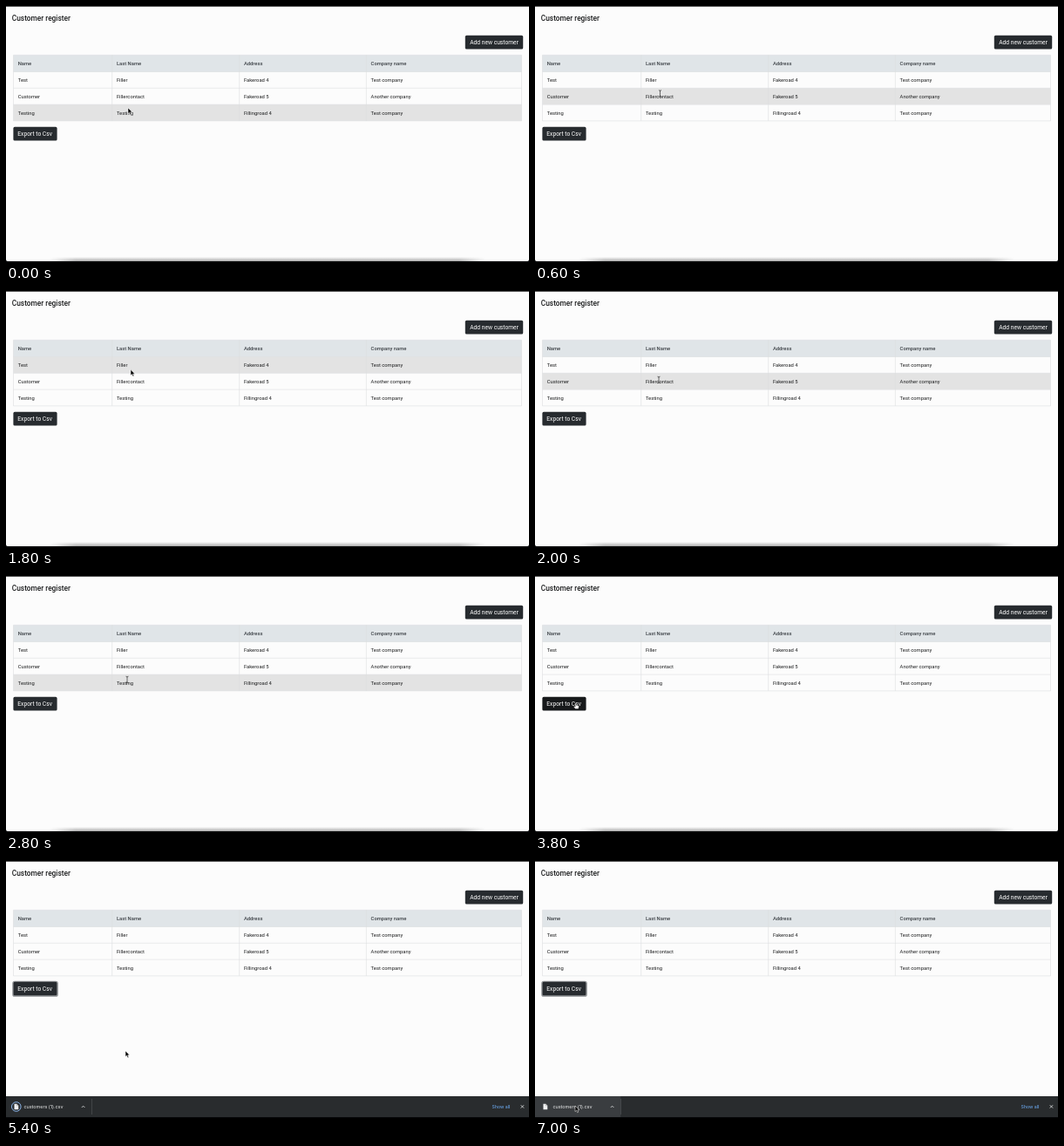
Recreate the animation shown at these times as an HTML page. Size 600 px wide and 295 px high, loop 8000 ms.

```html
<!DOCTYPE html>
<html lang="en">
<head>
<meta charset="utf-8">
<title>Customer register</title>
<style>
  html, body { margin: 0; width: 100%; height: 100%; overflow: hidden; background: #fcfcfc; }
  svg { display: block; width: 100%; height: 100%; font: 5.83px Roboto, sans-serif; fill: #1c1d1e; }
  .title { font-size: 8.33px; font-weight: 500; }
  .head { font-weight: 500; fill: #3c4146; }
  .button { font-size: 6.7px; fill: #fff; }
  .bar text { font: 5.4px Inter, sans-serif; fill: #eceded; }
  .bar .link { font-size: 5.2px; font-weight: 500; fill: #669fe0; }
  .line { fill: none; stroke: #dcdedf; stroke-width: .6; }
  .icon { fill: none; stroke: #e4e5e6; stroke-width: .8; }
</style>
</head>
<body>
<svg viewBox="0 0 600 295">
  <defs>
    <linearGradient id="fall" x2="0" y2="1">
      <stop offset="0" stop-color="#777" stop-opacity="0"/>
      <stop offset="1" stop-color="#777" stop-opacity=".6"/>
    </linearGradient>
    <linearGradient id="sides">
      <stop offset="0" stop-color="#000"/>
      <stop offset=".06" stop-color="#fff"/>
      <stop offset=".94" stop-color="#fff"/>
      <stop offset="1" stop-color="#000"/>
    </linearGradient>
    <mask id="fade"><rect x="50" y="287" width="500" height="7" fill="url(#sides)"/></mask>
  </defs>
  <rect width="600" height="295" fill="#fcfcfc"/>
  <rect width="600" height=".8" fill="#333"/>
  <text class="title" x="6.8" y="16.6">Customer register</text>

  <rect x="526.8" y="33.8" width="66.4" height="15.8" rx="1.6" fill="#272b2f"/>
  <text class="button" x="532.2" y="44.1">Add new customer</text>

  <rect x="8.5" y="56.3" width="583" height="19.2" fill="#e0e5e8"/>
  <rect id="hover" x="8.5" width="583" height="18.8" fill="#e3e3e3"/>
  <g id="table"></g>

  <rect id="ring" x="7.9" y="138.4" width="51.3" height="16.8" rx="2" fill="none" stroke="#8d9093" stroke-width="1.2"/>
  <rect id="export" x="8.4" y="138.8" width="50.2" height="15.8" rx="1.6"/>
  <text class="button" x="13.3" y="149.1">Export to Csv</text>

  <rect x="50" y="288" width="500" height="5" fill="url(#fall)" mask="url(#fade)"/>
  <path d="M0 291Q0 293 2 293H598Q600 293 600 291V295H0Z" fill="#050607"/>

  <g id="bar" class="bar">
    <rect y="270" width="600" height="24" fill="#292c2e"/>
    <rect id="item" y="270" width="98.3" height="24" fill="#3a3d40"/>
    <path d="M98.5 273V291" stroke="#55585a" stroke-width=".6"/>
    <circle id="progress" cx="11.8" cy="282" r="5.3" fill="none" stroke="#8ab4e8" stroke-width="1"/>
    <path d="M9.5 278.8H12.4L14.3 280.7V285.2H9.5Z" fill="#f1f2f3"/>
    <path d="M12.2 278.8V280.9H14.3" fill="none" stroke="#777" stroke-width=".4"/>
    <text x="20.5" y="284.1">customers (1).csv</text>
    <path class="icon" d="M86.8 283L88.6 281.2L90.4 283"/>
    <text class="link" x="557.6" y="283.6">Show all</text>
    <path class="icon" d="M590.7 280.2L594.1 283.6M594.1 280.2L590.7 283.6"/>
  </g>

  <g id="arrow">
    <path d="M0 0V6.6L1.5 5.2L2.6 7.7L3.8 7.2L2.7 4.8H4.8Z" fill="#000" stroke="#fff" stroke-width=".5"/>
  </g>
  <g id="beam">
    <path d="M-1.5 -3.8Q0 -3.8 0 -2.8Q0 -3.8 1.5 -3.8M0 -3V3M-1.5 3.8Q0 3.8 0 2.8Q0 3.8 1.5 3.8" fill="none" stroke="#222" stroke-width=".65"/>
  </g>
  <g id="hand">
    <path d="M-.7 .2Q0 -.6 .7 .2V2.4L3 2.8Q3.8 3.1 3.6 4.2L3 6.6H-.6L-2.4 4.2Q-2.3 3.2 -1.3 3.6L-.7 4.2Z" fill="#fff" stroke="#111" stroke-width=".4"/>
  </g>
</svg>
<script>
const LOOP = 8000, STEP = 200;
const $ = id => document.getElementById(id);
const show = (id, on) => $(id).style.display = on ? "" : "none";

const columns = [8.5, 121.7, 267.7, 413.4, 591.5];
const tops = [56.3, 75.5, 94.3, 113.1, 131.9];
const rows = [
  ["Name", "Last Name", "Address", "Company name"],
  ["Test", "Filler", "Fakeroad 4", "Test company"],
  ["Customer", "Fillercontact", "Fakeroad 5", "Another company"],
  ["Testing", "Testing", "Fillingroad 4", "Test company"]
];
const lines = tops.map(y => `M8.5 ${y}H591.5`).concat(columns.map(x => `M${x} 56.3V131.9`));
$("table").innerHTML = `<path class="line" d="${lines.join("")}"/>` +
  rows.map((row, r) => row.map((label, c) =>
    `<text class="${r ? "" : "head"}" x="${columns[c] + 5.2}" y="${(tops[r] + tops[r + 1]) / 2 + 2.1}">${label}</text>`
  ).join("")).join("");

// Pointer path: time, x, y
const path = [
  [0, 140, 117], [200, 141, 111], [600, 143.5, 100.5], [1200, 145, 64],
  [1400, 145, 67], [2000, 142, 102], [2400, 141, 110], [2800, 139, 119],
  [3000, 139, 119], [3400, 72, 140], [3600, 50, 146], [3800, 46.8, 146],
  [4800, 46.8, 146], [5000, 80, 165], [5200, 122, 192], [5400, 137, 218],
  [5600, 135, 227], [6000, 100, 246], [6400, 62, 262], [6600, 53, 274],
  [7000, 46, 281], [LOOP, 46, 281]
];

function pointer(t) {
  const i = path.findIndex(p => p[0] > t);
  const [t0, x0, y0] = path[i - 1], [t1, x1, y1] = path[i];
  const k = (t - t0) / (t1 - t0);
  return [x0 + (x1 - x0) * k, y0 + (y1 - y0) * k];
}

function draw(now) {
  const t = Math.floor(now % LOOP / STEP) * STEP;
  const [x, y] = pointer(t);
  const row = tops.findIndex((top, i) => y >= top && y < tops[i + 1]);
  const overText = row >= 0 && x > 126 && Math.abs(y - (tops[row] + tops[row + 1]) / 2) < 3.6;
  const overButton = x > 8 && x < 59 && y > 139 && y < 155;
  const kind = overButton ? "hand" : overText ? "beam" : "arrow";

  for (const id of ["arrow", "beam", "hand"]) show(id, id === kind);
  $(kind).setAttribute("transform", `translate(${x} ${y})`);
  show("hover", row > 0);
  if (row > 0) $("hover").setAttribute("y", tops[row]);
  $("export").setAttribute("fill", overButton ? "#17191b" : "#272b2f");
  show("ring", t >= 4200);
  show("bar", t >= 4600);
  show("item", x < 98 && y > 270);
  $("progress").style.opacity = Math.min(1, Math.max(0, (6400 - t) / 800));
  requestAnimationFrame(() => draw(performance.now()));
}
draw(0);
</script>
</body>
</html>
```
